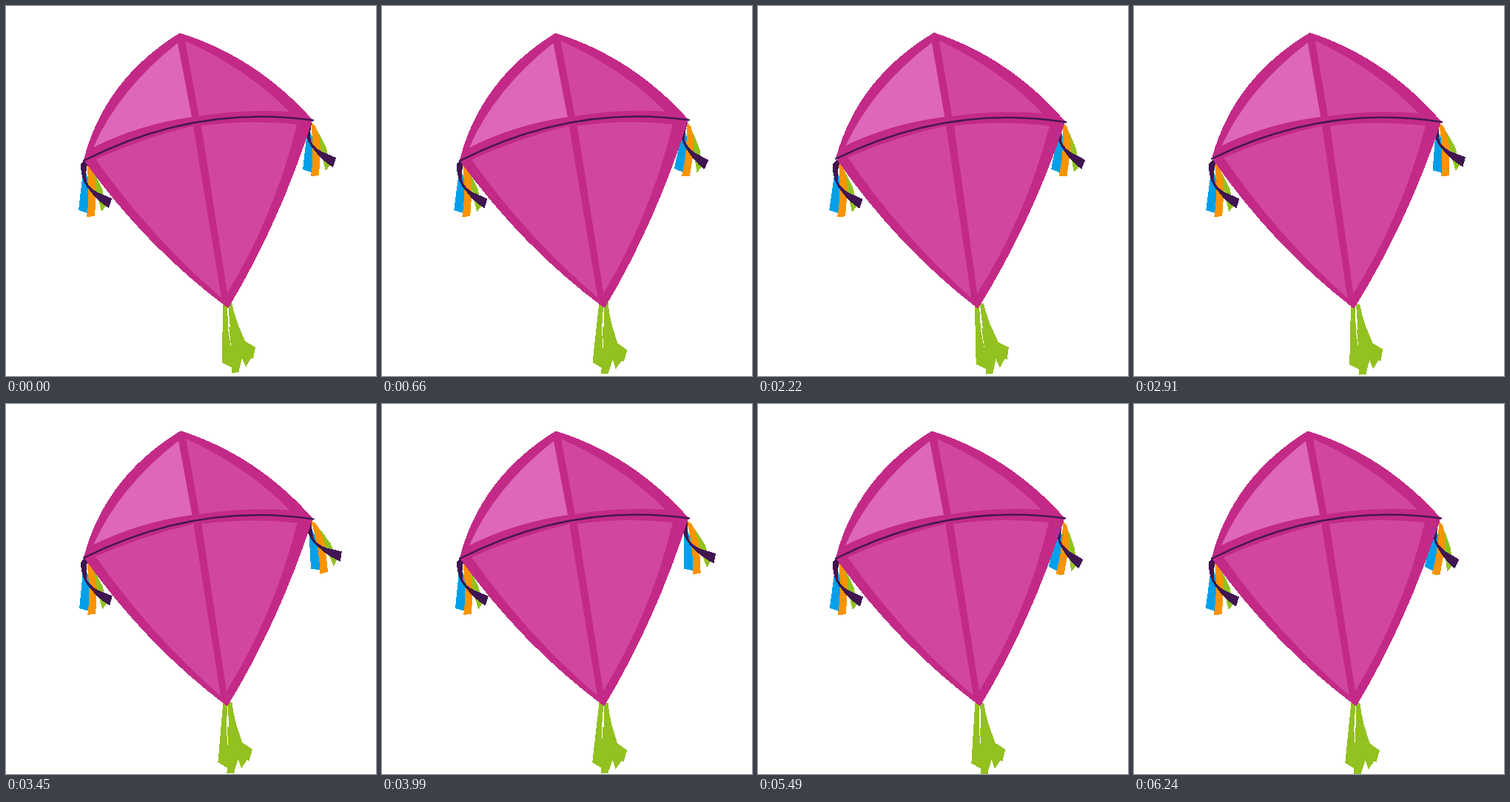
An HTML page that plays this animation: 500x500 px, repeating every 6300 ms.

```html
<!DOCTYPE html>
<html lang="en">
<head>
<meta charset="utf-8">
<title>Kite</title>
<style>
  html, body { margin: 0; width: 100%; height: 100%; overflow: hidden; background: #fff; }
  svg { display: block; width: 100vw; height: 100vh; }
  .crisp { shape-rendering: crispEdges; }
</style>
</head>
<body>
<svg viewBox="0 0 500 500">
  <defs>
    <g id="tassel" class="crisp">
      <path fill="#93c120" d="M112 214L121 229L130 247L135 270L129 278L123 254Z"/>
      <path fill="#009fe8" d="M104 224L98 276L111 280L113 238L107 222Z"/>
      <path fill="#f99300" d="M109 212L115 217Q121 231 122 248L120 284L109 285Q114 255 109 212Z"/>
      <path fill="#3f1651" d="M101 214L107 207L110 213Q107 226 109 238Q113 246 124 252L143 260L139 273Q124 264 113 249Q101 236 101 214Z"/>
    </g>
  </defs>
  <g id="tail" class="crisp" fill="#93c120">
    <path d="M293 400H299L300 436L304 462L306 489L292 482Z"/>
    <path d="M301 432L305 437L316 466L315 495L305 496L304 460Z"/>
    <path d="M300 400H305L308 413L313 429L323 453L337 461L334 477L331 476L324 488L319 476L315 492L306 464L302 425Z"/>
  </g>
  <use id="left" href="#tassel"/>
  <use id="right" href="#tassel"/>
  <g id="body">
    <path class="crisp" fill="#c32a87" stroke="#c32a87" stroke-width="2" stroke-linejoin="round"
      d="M235 37.5Q338 70 413 154Q370 290 300 407Q190 325 106 208Q134 100 235 37.5Z"/>
    <path fill="#de67b9" d="M232 50L251 150Q180 160 118 191Q153 112 232 50Z"/>
    <g fill="#d1479f">
      <path d="M242 47Q326 85 383 143Q322 139 261 149Z"/>
      <path d="M121 207Q186 178 253 162L291 394Q196 313 121 207Z"/>
      <path d="M264 162Q328 153 393 160Q363 283 299 388Z"/>
    </g>
    <path fill="none" stroke="#451657" stroke-width="2.5" stroke-linecap="round" d="M105 209Q256 132 415 154.5"/>
  </g>
</svg>
<script>
const LOOP = 6300, STEP = 30, SETTLE = 4650;

const wave = u => (1 - Math.cos(Math.PI * u)) / 2;
const gust = u => u * u;

// Moves from one turning point to the next; each is [time in ms, angle, easing].
function swing(time, points) {
  let [start, angle] = points[0];
  for (const [end, goal, ease = wave] of points.slice(1)) {
    if (time < end) return angle + (goal - angle) * ease((time - start) / (end - start));
    [start, angle] = [end, goal];
  }
  return angle;
}

const place = (id, transform) => document.getElementById(id).setAttribute("transform", transform);

function draw(time) {
  const body = swing(time, [[0, 0], [1380, -0.35], [1980, 0.95], [2760, 0.95], [3960, 0]]);
  const right = swing(time, [[0, 0], [1100, 8.4], [3600, -12, gust], [SETTLE, 7.5]]);
  const tail = swing(time, [[0, 0], [1380, 12], [2220, -2], [3990, 5.8], [SETTLE, 0], [6240, 5]]);
  const left = 0.14 * right + body;
  const drop = 4 * Math.min(time / SETTLE, 1);

  place("body", `rotate(${body} 266 225)`);
  place("left", `rotate(${left} 105 211)`);
  place("right", `translate(303 ${drop / 4 - 55}) rotate(${right} 109 211)`);
  place("tail", `translate(0 ${drop}) rotate(${tail} 300 405)`);
}

const start = performance.now();
function tick() {
  const elapsed = (performance.now() - start) % LOOP;
  draw(Math.min(Math.floor(elapsed / STEP) * STEP, LOOP - 2 * STEP));
  requestAnimationFrame(tick);
}
tick();
</script>
</body>
</html>
```
